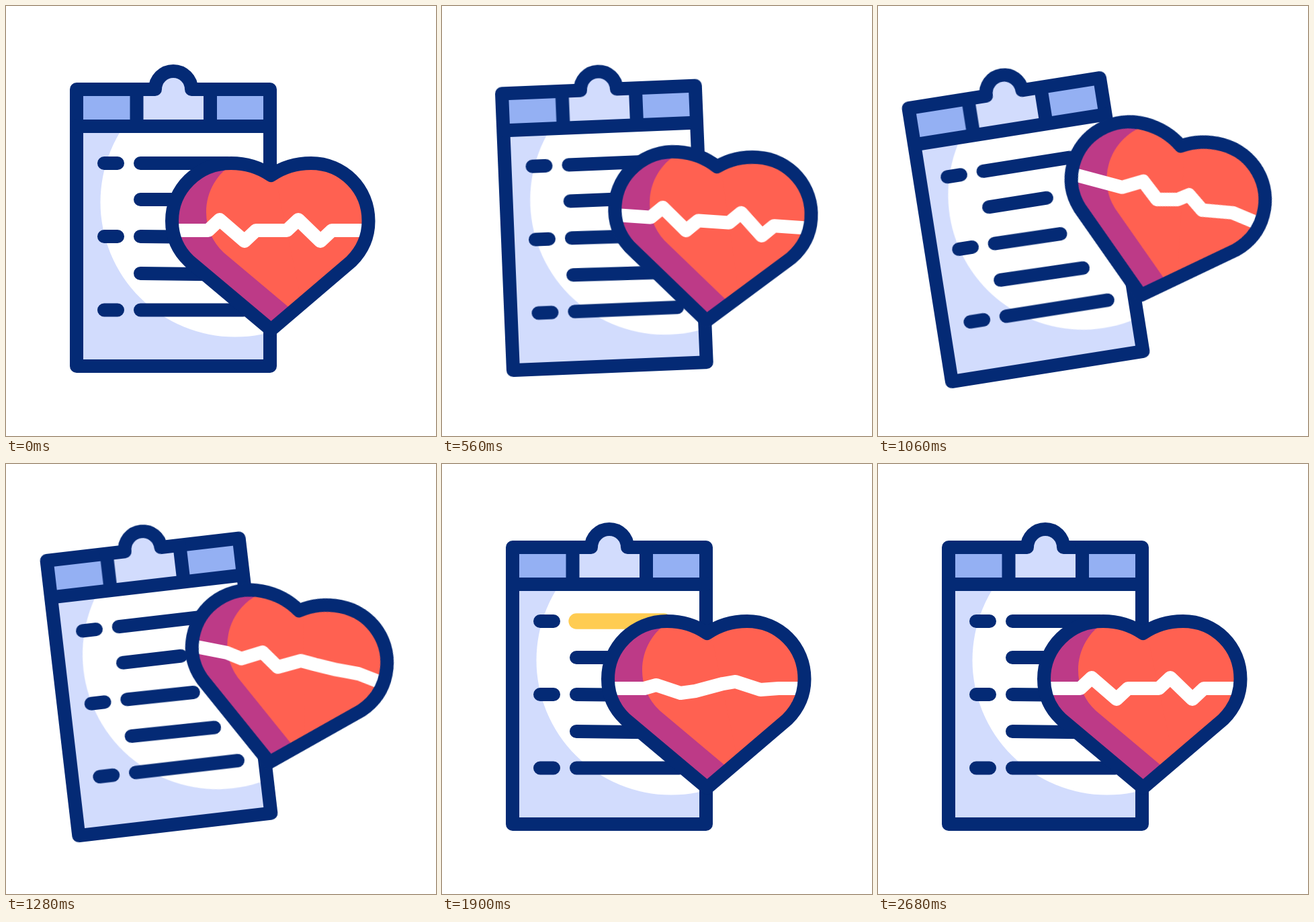
An HTML page without scripts for the animation above (3020 ms loop, 640 px wide and 640 px high).

```html
<!DOCTYPE html>
<html lang="en">
<head>
<meta charset="utf-8">
<title>Health report</title>
<style>
  html, body { margin: 0; width: 100%; height: 100%; overflow: hidden; background: #fff; }
  svg { display: block; width: 100%; height: 100%; }

  .ink { fill: none; stroke: #042a75; stroke-width: 20; stroke-linecap: round; stroke-linejoin: round; }
  .light { fill: #d2dcfd; }
  .blue { fill: #94b0f3; }

  .board, .heart, .pulse, .glow, .glow use { animation: 3.02s linear infinite; }
  .board { transform-origin: 254px 516px; animation-name: tilt; }
  .heart { transform-origin: 394.5px 469px; animation-name: lift; }
  .board, .heart { animation-timing-function: cubic-bezier(.333, 0, .667, 1); }

  @keyframes tilt {
    0%, 11.258%, 56.954%, 100% { transform: rotate(0deg); }
    33.113%, 35.099% { transform: rotate(-9deg); }
  }
  @keyframes lift {
    0%, 11.258%, 56.954%, 100% { transform: translateY(0px) rotate(0deg); }
    33.113%, 35.099% { transform: translateY(-51px) rotate(15deg); }
  }

  .pulse { fill: none; stroke: #fff; stroke-width: 20; stroke-linejoin: round; animation-name: beat; }
  @keyframes beat {
    0%, 18.543%, 74.834%, 100% { d: path("M248 334L301 334L318 318L355 350L372 334L418 334L435 318L468 350L485 334L540 334"); }
    24.503% { d: path("M248 334L301 334L320 322L355 338L379 334L417 334L430 316L460 348L486 331L540 334"); }
    35.099% { d: path("M248 334L301 334L326 334L354 317L381 338L411 330L425 319L450 336L495 328L540 334"); }
    49.669% { d: path("M248 334L301 334L322 343L352 329L378 343L412 319L441 333L478 319L503 326L540 335"); }
    62.914% { d: path("M248 334L301 334L319 329L355 341L377 338L418 327L437 324L474 336L501 334L540 334"); }
  }

  /* Lines light up one after another, then fade back together. */
  .glow { fill: none; stroke: #ffcc52; stroke-linecap: round; opacity: 0; animation-name: fade; }
  .glow use { opacity: 0; animation-name: pop; animation-delay: calc(var(--i) * 150ms); }
  @keyframes fade {
    0%, 57.6% { opacity: 0; }
    57.61%, 82.781% { opacity: 1; }
    88.742%, 100% { opacity: 0; }
  }
  @keyframes pop {
    0%, 58.278% { opacity: 0; stroke-width: 20px; }
    62.252% { opacity: 1; stroke-width: 24px; }
    66.225%, 100% { opacity: 1; stroke-width: 20px; }
  }
</style>
</head>
<body>
<svg viewBox="0 0 640 640">
  <defs>
    <path id="heart" d="M394.5 252C377 240 356 234 335 234C286 234 247 272 247 320C247 343 256 364 273 380L394.5 482L514 380C530 364 539.5 343 539.5 320C539.5 272 502 234 454 234C432 234 412 240 394.5 252Z"/>
    <clipPath id="in-heart"><use href="#heart"/></clipPath>
    <clipPath id="in-page"><path d="M105 179H393V536H105Z"/></clipPath>
    <path id="line1" d="M200 234H330"/>
    <path id="line2" d="M200 288H287"/>
    <path id="line3" d="M200 343L299 344"/>
    <path id="line4" d="M200 398L324 399.6"/>
    <path id="line5" d="M200 452.5H353"/>
  </defs>

  <g class="board">
    <path class="light" d="M105 179H393V536H105Z"/>
    <circle cx="341" cy="292" r="200.5" fill="#fff" clip-path="url(#in-page)"/>
    <path class="blue" d="M105 124H393V179H105Z"/>
    <path class="light" d="M194.5 179V124H222A27 27 0 0 1 276 124H304V179Z"/>
    <g class="ink">
      <path d="M276 124H393V536H105V124H222A27 27 0 0 1 276 124Z"/>
      <path d="M105 179H393M194.5 124V179M304 124V179"/>
      <path d="M146 234H166M146 343H166M146 452.5H166"/>
      <use href="#line1"/>
      <use href="#line2"/>
      <use href="#line3"/>
      <use href="#line4"/>
      <use href="#line5"/>
    </g>
    <g class="glow">
      <use href="#line1" style="--i:0"/>
      <use href="#line2" style="--i:1"/>
      <use href="#line3" style="--i:2"/>
      <use href="#line4" style="--i:3"/>
      <use href="#line5" style="--i:4"/>
    </g>
  </g>

  <g class="heart">
    <g clip-path="url(#in-heart)">
      <use href="#heart" fill="#bd3a87"/>
      <use href="#heart" x="51" y="-13" fill="#ff6151"/>
      <!-- fills the notch left by the shifted shape -->
      <path d="M394 221H545V360L440 440Z" fill="#ff6151"/>
      <path class="pulse" d="M248 334L301 334L318 318L355 350L372 334L418 334L435 318L468 350L485 334L540 334"/>
    </g>
    <use href="#heart" class="ink"/>
  </g>
</svg>
</body>
</html>
```
